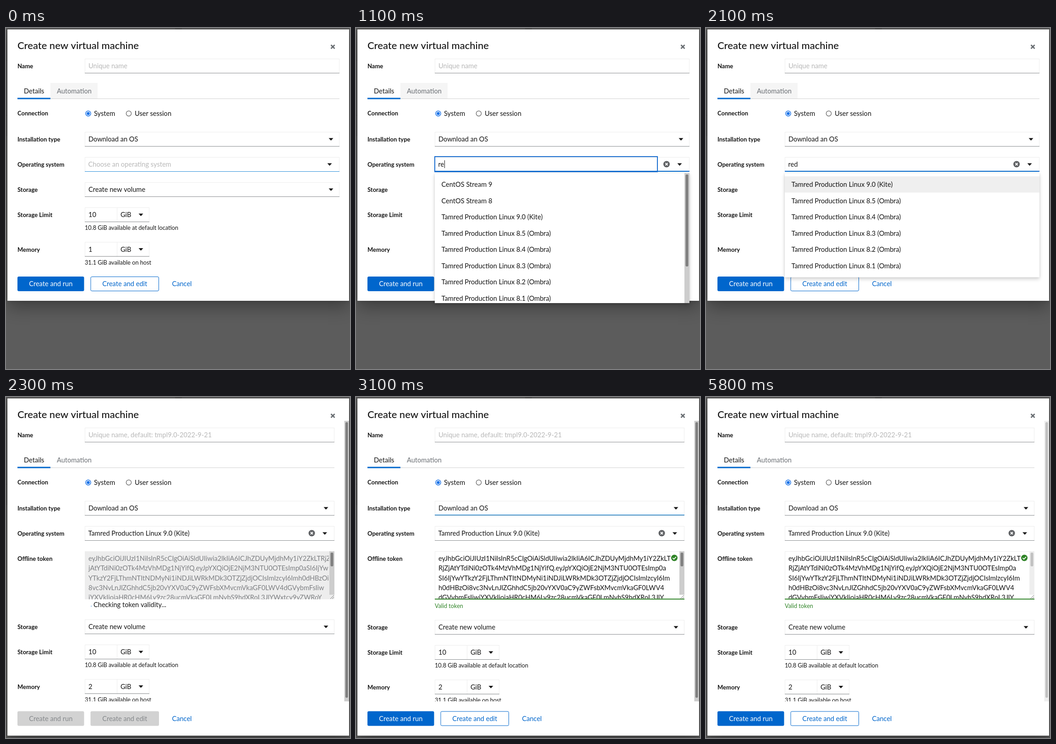
Recreate the animation shown at these times as an HTML page with a canvas. Size 751 px wide and 745 px high, loop 6 s.

```html
<!DOCTYPE html>
<html lang="en">
<head>
<meta charset="utf-8">
<title>Create new virtual machine</title>
<style>
html, body { margin: 0; width: 100%; height: 100%; overflow: hidden; background: #5c5c5c; }
canvas { display: block; }
</style>
</head>
<body>
<canvas id="stage" width="751" height="745"></canvas>
<script>
const ctx = document.getElementById('stage').getContext('2d');
const LOOP = 6000;
const FACE = 'Lato, "Open Sans", sans-serif';
const BODY = `14.6px ${FACE}`;
const SMALL = `12.7px ${FACE}`;
const LABEL = `bold 13px ${FACE}`;
const TITLE = `500 22px ${FACE}`;
const INK = '#151515', MUTED = '#6a6e73', HINT = '#b8b8b8', BLUE = '#0066cc';
const EDGE = '#ededed', LINE = '#8a8d90', GREEN = '#2f8427';

const LATEST = 'Tamred Production Linux 9.0 (Kite)';
const RELEASES = [LATEST, ...[5, 4, 3, 2, 1].map(n => `Tamred Production Linux 8.${n} (Ombra)`)];
const STREAMS = ['CentOS Stream 9', 'CentOS Stream 8'];

const WIDE_ROWS = [
  'eyJhbGciOiJIUzI1NiIsInR5cCIgOiAiSldUIiwia2lkIiA6ICJhZDUyMjdhMy1iY2ZkLTRjZ',
  'jAtYTdiNi0zOTk4MzVhMDg1NjYifQ.eyJpYXQiOjE2NjM3NTU0OTEsImp0aSI6IjYw',
  'YTkzY2FjLThmNTItNDMyNi1iNDJiLWRkMDk3OTZjZjdjOCIsImlzcyI6Imh0dHBzOi',
  '8vc3NvLnJlZGhhdC5jb20vYXV0aC9yZWFsbXMvcmVkaGF0LWV4dGVybmFsIiw',
  'iYXVkIjoiaHR0cHM6Ly9zc28ucmVkaGF0LmNvbS9hdXRoL3JlYWxtcy9yZWRoY'
];
const TOKEN = WIDE_ROWS.join('');
// The status icon narrows the text area, so rows break earlier.
const breaks = [0, ...['RjZjAt', 'SI6Ij', 'h0dHBz', 'dGVyb', 'Wxtcy'].map(s => TOKEN.indexOf(s))];
const NARROW_ROWS = breaks.slice(1).map((end, i) => TOKEN.slice(breaks[i], end));

function rect(x, y, w, h, color) {
  ctx.fillStyle = color;
  ctx.fillRect(x, y, w, h);
}

function rounded(x, y, w, h, r, color) {
  ctx.beginPath();
  ctx.roundRect(x, y, w, h, r);
  ctx.fillStyle = color;
  ctx.fill();
}

function disc(x, y, r, color) {
  ctx.beginPath();
  ctx.arc(x, y, r, 0, Math.PI * 2);
  ctx.fillStyle = color;
  ctx.fill();
}

function path(points, width, color) {
  ctx.beginPath();
  points.forEach(([x, y], i) => i ? ctx.lineTo(x, y) : ctx.moveTo(x, y));
  ctx.lineWidth = width;
  ctx.strokeStyle = color;
  ctx.stroke();
}

function cross(x, y, r, width, color) {
  path([[x - r, y - r], [x + r, y + r]], width, color);
  path([[x + r, y - r], [x - r, y + r]], width, color);
}

function text(str, x, y, font = BODY, color = INK, align = 'left') {
  ctx.font = font;
  ctx.fillStyle = color;
  ctx.textAlign = align;
  ctx.fillText(str, x, y);
}

function clipped(x, y, w, h, draw) {
  ctx.save();
  ctx.beginPath();
  ctx.rect(x, y, w, h);
  ctx.clip();
  draw();
  ctx.restore();
}

function faded(alpha, draw) {
  ctx.save();
  ctx.globalAlpha = alpha;
  draw();
  ctx.restore();
}

function shadowed(blur, dy, alpha, draw) {
  ctx.save();
  ctx.shadowColor = `rgba(3,3,3,${alpha})`;
  ctx.shadowBlur = blur;
  ctx.shadowOffsetY = dy;
  draw();
  ctx.restore();
}

function arrow(x, y) {
  ctx.beginPath();
  ctx.moveTo(x - 5, y - 2.5);
  ctx.lineTo(x + 5, y - 2.5);
  ctx.lineTo(x, y + 3);
  ctx.fillStyle = INK;
  ctx.fill();
}

function box(x, y, right, h = 32, line = LINE, width = 1) {
  ctx.lineWidth = 1;
  ctx.strokeStyle = EDGE;
  ctx.strokeRect(x + .5, y + .5, right - x - 1, h - 1);
  rect(x, y + h - width, right - x, width, line);
}

function label(str, y) {
  text(str, 25, y, LABEL);
}

function select(name, value, y, right) {
  label(name, y + 21);
  box(172, y, right);
  text(value, 180, y + 21);
  arrow(right - 18.5, y + 16);
}

function amount(name, value, note, y) {
  label(name, y + 21);
  box(172, y, 243);
  box(242, y, 313);
  text(value, 180, y + 21);
  text('GiB', 250, y + 21);
  arrow(294.5, y + 16);
  text(note, 172, y + 49, SMALL);
}

function clearIcon(x, y) {
  disc(x, y, 7, '#5f6164');
  cross(x, y, 2.6, 2, '#fff');
}

function scrollbar(x, y, w, h, thumbY, thumbH, light) {
  rect(x, y, w, h, light ? '#eeeeee' : '#cdcdcd');
  rounded(x + 2.5, thumbY, w - 5, thumbH, 2.5, light ? '#c1c1c1' : '#7f7f7f');
}

function backdrop(bottom) {
  rect(0, 0, 751, 745, '#5c5c5c');
  rect(0, 0, 4, 236, '#575757');
  rect(369, 0, 15, 4, '#525252');
  rect(0, 70, 4, 1, '#4e4e4e');
  rect(0, 190, 4, 1, '#4e4e4e');
  const panel = () => rect(3.5, 3.5, 745.5, bottom - 3.5, '#fff');
  shadowed(32, 16, .3, panel);
  shadowed(8, 0, .2, panel);
  panel();
}

function header(right, hint, tabHover) {
  text('Create new virtual machine', 25, 46, TITLE);
  cross(713.5, 41, 4, 2.8, MUTED);
  label('Name', 88);
  box(172, 67, right);
  text(hint, 180, 88, BODY, HINT);

  if (tabHover) rect(97, 120, 103, 35, '#f5f5f5');
  rect(25, 154, right - 25, 1, '#d2d2d2');
  rect(25, 152.5, 72, 3, BLUE);
  text('Details', 39, 143);
  text('Automation', 111, 143, BODY, MUTED);

  label('Connection', 191);
  ctx.lineWidth = 1.5;
  for (const [x, color] of [[179.5, '#1a73e8'], [268, '#767676']]) {
    ctx.beginPath();
    ctx.arc(x, 186.8, 5.6, 0, Math.PI * 2);
    ctx.strokeStyle = color;
    ctx.stroke();
  }
  disc(179.5, 186.8, 3.4, '#1a73e8');
  text('System', 192, 192);
  text('User session', 281, 192);
  select('Installation type', 'Download an OS', 227, right);
}

function button(str, x, w, y, kind) {
  const plain = kind === 'outline';
  rounded(x, y, w, 32, 3, { primary: BLUE, outline: '#fff', disabled: '#d2d2d2' }[kind]);
  if (plain) {
    ctx.beginPath();
    ctx.roundRect(x + .5, y + .5, w - 1, 31, 2.5);
    ctx.lineWidth = 1;
    ctx.strokeStyle = BLUE;
    ctx.stroke();
  }
  const color = { primary: '#fff', outline: BLUE, disabled: '#85888b' }[kind];
  text(str, x + w / 2, y + 21, BODY, color, 'center');
}

function footer(y, ready) {
  const pair = (a, b) => {
    button('Create and run', 25, 145.5, y, a);
    button('Create and edit', 184.5, 149.5, y, b);
  };
  if (ready < 1) pair('disabled', 'disabled');
  faded(ready, () => pair('primary', 'outline'));
  text('Cancel', 384, y + 21, BODY, BLUE, 'center');
}

function menu(rows, overflow) {
  const bottom = overflow ? 601 : 544.5;
  const panel = () => rect(172, 317, 556, bottom - 317, '#fff');
  shadowed(8, 4, .16, panel);
  shadowed(4, 0, .1, panel);
  if (!overflow) rect(172, 324, 556, 35.5, '#efefef');
  clipped(172, 317, 556, bottom - 317, () => {
    rows.forEach((row, i) => text(row, 186.5, 347.3 + i * 35.5));
    if (overflow) scrollbar(717, 317, 11, 284, 320, 201, false);
  });
}

function chooser(t) {
  const open = t >= 800;
  const typed = t < 1000 ? '' : 'red'.slice(0, t < 1100 ? 1 : t < 1300 ? 2 : 3);
  const focus = !open || t >= 2100 ? 0 : t >= 2000 ? .5 : 1;

  backdrop(596);
  header(728, 'Unique name', true);
  label('Operating system', 303);
  box(172, 282, 728, 32, open ? BLUE : '#2b8fd9', open ? 2 : 1);
  select('Storage', 'Create new volume', 337, 728);
  amount('Storage Limit', '10', '10.8 GiB available at default location', 392);
  amount('Memory', '1', '31.1 GiB available on host', 467.5);
  footer(543, 1);

  if (open) menu(t < 1300 ? [...STREAMS, ...RELEASES] : RELEASES, t < 1300);
  faded(focus, () => {
    ctx.lineWidth = 2;
    ctx.strokeStyle = '#1b6fd0';
    ctx.strokeRect(172, 281, 486, 33);
  });
  text(typed || 'Choose an operating system', 179.5, 303, BODY, typed ? INK : HINT);
  if (focus === 1) {
    ctx.font = BODY;
    rect(Math.round(180 + ctx.measureText(typed).width), 289, 1, 17, INK);
  }
  if (typed) clearIcon(678, 297.5);
  arrow(706.5, 298);
}

function tokenArea(valid, ready, light) {
  rect(172, 337, 545, 105, '#ededed');
  if (valid) faded(ready, () => rect(172, 337, 545, 105, '#fff'));
  if (valid) box(172, 337, 717, 105.5, GREEN, 2);
  const rows = valid ? NARROW_ROWS : WIDE_ROWS;
  clipped(172, 337, 533, valid ? 103.5 : 105, () =>
    rows.forEach((row, i) => text(row, 180, 358 + i * 21.3, BODY, valid ? INK : '#7d7f82')));
  scrollbar(706, 337, 11, 95, 340, 30, light);
  for (const d of [4, 8]) path([[716 - d, 441], [716, 441 - d]], 1, '#777');
  if (valid) {
    disc(695, 351.5, 7, GREEN);
    path([[691.3, 351.7], [694, 354.3], [698.8, 349.3]], 1.8, '#fff');
  }
}

function tokenForm(t) {
  const valid = t >= 2800;
  const ready = valid ? Math.min(1, .1 + (t - 2800) / 300 * .9) : 0;
  const light = t >= 5800;
  const shift = valid ? 1 : 0;

  backdrop(739.5);
  header(717, 'Unique name, default: tmpl9.0-2022-9-21', false);
  if (valid && t < 4400) faded(ready, () => rect(172, 257, 545, 1.5, '#2b8fd9'));
  label('Operating system', 303);
  box(172, 282, 717);
  text(LATEST, 179.5, 303);
  clearIcon(667.5, 297.5);
  arrow(696, 298);

  label('Offline token', 358);
  tokenArea(valid, ready, light);
  if (valid) {
    text('Valid token', 172, 461, SMALL, GREEN);
  } else {
    if (t < 2400) disc(186.2, 457, .8, BLUE);
    else {
      ctx.beginPath();
      ctx.arc(180, 455, 6, .3, 2.2);
      ctx.lineWidth = 1.5;
      ctx.strokeStyle = BLUE;
      ctx.stroke();
    }
    text('Checking token validity...', 191, 459);
  }

  clipped(4, 480, 735, 185, () => {
    select('Storage', 'Create new volume', 486 + shift, 717);
    amount('Storage Limit', '10', '10.8 GiB available at default location', 541 + shift);
    amount('Memory', '2', '31.1 GiB available on host', 616.5 + shift);
  });
  scrollbar(738.5, 52, 10.5, 613, 55, 602, light);
  footer(686.5, ready);
}

function render(time) {
  const t = Math.floor(time % LOOP / 100) * 100;
  ctx.clearRect(0, 0, 751, 745);
  if (t < 2300) chooser(t);
  else tokenForm(t);
}

const start = performance.now();
function tick() {
  render(performance.now() - start);
  requestAnimationFrame(tick);
}
tick();
</script>
</body>
</html>
```
